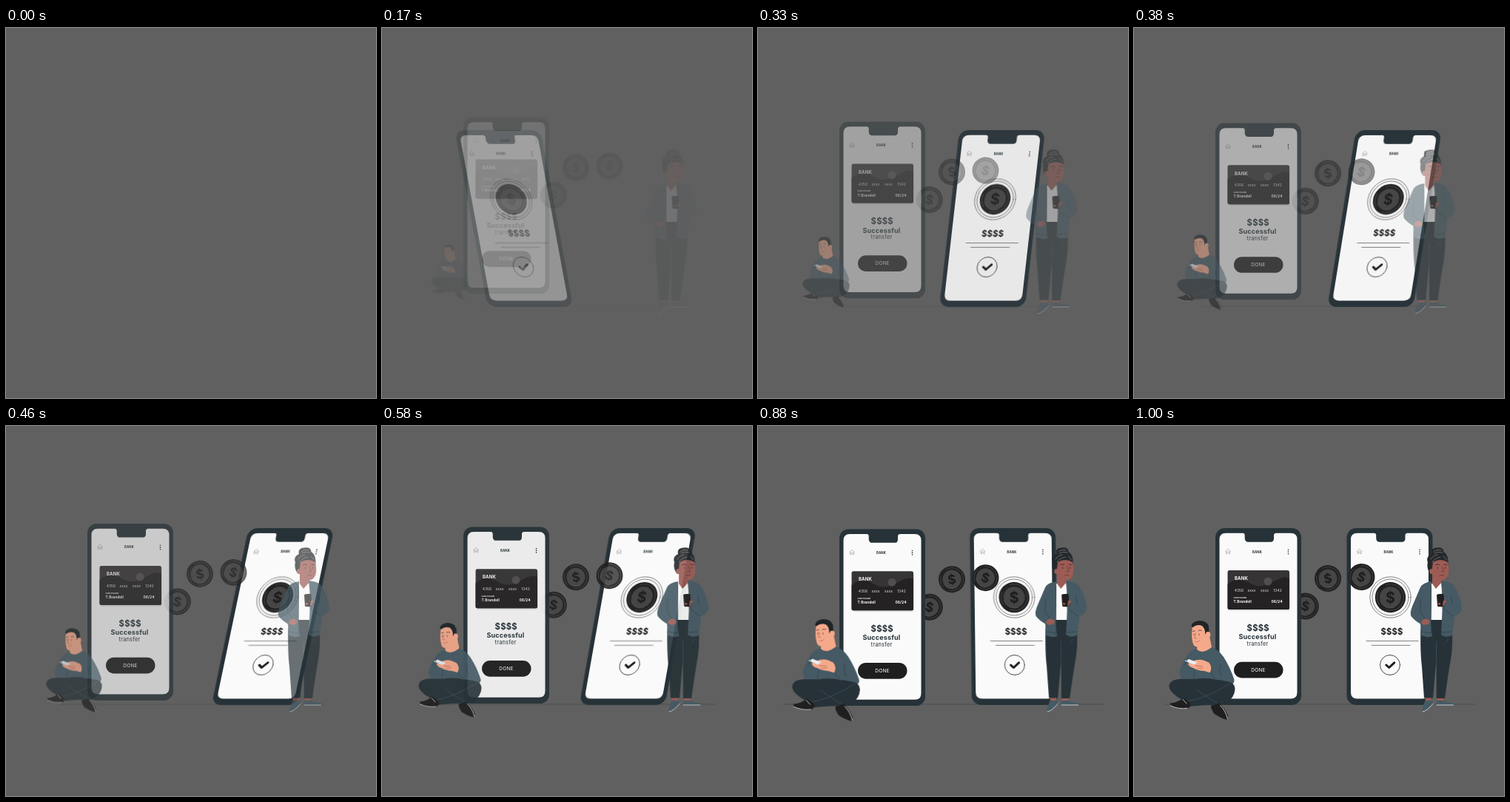
These frames come from a looping animation (500 by 500 pixels, 1.04 s). An HTML page:

```html
<!DOCTYPE html>
<html lang="en">
<head>
<meta charset="utf-8">
<title>Transfer</title>
<style>
  html, body { margin: 0; width: 100%; height: 100%; overflow: hidden; background: #606060; }
  svg { display: block; width: 100vw; height: 100vh; }
  text { font-family: Inter, "Open Sans", sans-serif; text-anchor: middle; letter-spacing: .02em; }
  .b { font-weight: 700; }
  .start { text-anchor: start; }
  .move { transform-box: fill-box; transform-origin: center; opacity: 0; }
  .floor { transform-box: view-box; transform-origin: 251px 376px; }
  .line { fill: none; stroke-linecap: round; stroke-linejoin: round; }
  .skin { fill: #f5a98b; }
  .brown { fill: #9c5c55; }
  .slate { fill: #455a64; }
  .navy { fill: #263238; }
  .ink { fill: #1f1f1f; }
</style>
</head>
<body>
<svg viewBox="0 0 500 500">
  <defs>
    <g id="shell">
      <rect class="navy" width="116" height="239" rx="12.5"/>
      <path fill="#fafafa" d="M14 6.800 H37 Q39.500 6.800 39.700 9.500 V14 Q40 18.700 44.500 18.700 H74.500 Q79 18.700 79 14 V9.500 Q79.300 6.800 82 6.800 H102 Q110.500 6.800 110.500 15.300 V222 Q110.500 230.500 102 230.500 H14 Q5.500 230.500 5.500 222 V15.300 Q5.500 6.800 14 6.800 Z"/>
      <path class="line" stroke="#888" stroke-width=".5" d="M13.800 31.500 L17 28 L20.300 31.500 M14.600 31 V34.600 H16 V32 H18.200 V34.600 H19.700 V31"/>
      <g class="ink"><circle cx="98.500" cy="29.300" r=".8"/><circle cx="98.500" cy="32" r=".8"/><circle cx="98.500" cy="34.700" r=".8"/></g>
      <text class="b" x="56.500" y="33.500" font-size="4.300" fill="#263238">BANK</text>
    </g>
    <g id="coin">
      <circle r="18" fill="#232222"/>
      <circle r="15.500" fill="none" stroke="#414040" stroke-width=".9" stroke-dasharray="30 9 16 12"/>
      <circle r="12.500" fill="#464545"/>
      <path class="line" stroke="#5a5959" stroke-width=".7" d="M-12 4 A12.500 12.500 0 0 0 4 12"/>
      <text class="b" y="6.100" font-size="17" fill="#1d1c1c">$</text>
    </g>
  </defs>

  <path class="move floor line" data-move="zoom" stroke="#3b454a" stroke-width=".6" d="M41 376 H461"/>

  <g class="move" data-move="speed">
    <use href="#shell" x="287.500" y="138"/>
    <g class="line" stroke="#333" stroke-width=".6">
      <circle cx="346.500" cy="231.500" r="27.700"/>
      <circle cx="346.500" cy="231.500" r="24.500"/>
      <path d="M314 290.500 H384 M321 296.400 H373"/>
      <circle cx="346" cy="323" r="13.500" stroke="#1f1f1f" stroke-width=".8"/>
    </g>
    <use href="#coin" transform="translate(346.500 231.500) scale(1.150)"/>
    <text class="b" x="348.500" y="281.600" font-size="11.200" fill="#1f1f1f">$$$$</text>
    <path class="line" stroke="#1f1f1f" stroke-width="3" stroke-linecap="butt" d="M340.800 323 L344.700 326.500 L351.800 319.800"/>
  </g>

  <g class="move" data-move="down">
    <use href="#coin" transform="translate(231.800 243.500) rotate(12)"/>
    <use href="#coin" transform="translate(262 206) rotate(-10)"/>
    <use href="#coin" transform="translate(307.500 204) rotate(17)"/>
  </g>

  <g class="move" data-move="down">
    <use href="#shell" x="110" y="138"/>
    <rect x="128" y="197" width="83" height="53" rx="3" fill="#e2e2e2"/>
    <rect x="126.500" y="195" width="83.500" height="53" rx="2.500" fill="#363434"/>
    <path fill="#242222" d="M126.500 214 C136 205 148 207 158 213 S176 216 185 212 S202 201 210 206 V245.500 Q210 248 207.500 248 H129 Q126.500 248 126.500 245.500 Z"/>
    <circle cx="181" cy="210" r="5.500" fill="#514e4e"/>
    <g fill="#fff">
      <text class="b start" x="136" y="208.300" font-size="6">BANK</text>
      <g font-size="4.900" fill="#e4e4e4">
        <text x="142" y="224">4356</text><text x="159" y="224">xxxx</text>
        <text x="176.500" y="224">xxxx</text><text x="194" y="224">1342</text>
      </g>
      <text class="start b" x="134.500" y="232.800" font-size="2.400">CARD HOLDER</text>
      <text class="start b" x="134.500" y="239" font-size="4.700">T.Brandell</text>
      <text class="b" x="193" y="239" font-size="4.900">06/24</text>
    </g>
    <g fill="#263238">
      <text class="b" x="167.700" y="276.700" font-size="11.200">$$$$</text>
      <text class="b" x="167" y="288" font-size="9">Successful</text>
      <text x="167" y="296.700" font-size="7.500">transfer</text>
    </g>
    <rect class="ink" x="135" y="318.800" width="66.500" height="21.700" rx="10.800"/>
    <text x="168" y="331.800" font-size="6.600" fill="#fff">DONE</text>
  </g>

  <g class="move" data-move="zoom">
    <path class="slate" d="M84 301 Q75 304 71 311 Q64 322 61 333 L65 345 H118 L128 351 Q136 349 135.500 343 Q130 326 121 312 Q114 302 105 299 Z"/>
    <path class="skin" d="M86 291 L85 302 Q92 309 105 299 L102 284 Z"/>
    <path class="skin" d="M79 271 Q77 284 79.500 293 Q81 300 88 298 Q97 296 101 288 L100 268 Q88 264 79 271 Z"/>
    <path fill="#1e2427" d="M77.500 271 Q78 264 88 263 Q99 263 101 271 L101.500 279 Q99 277 98.500 282 L96 281 Q96.500 274 92 270 Q85 267.500 79.500 272 Z"/>
    <ellipse class="skin" cx="100" cy="282" rx="3.300" ry="4"/>
    <g class="line" stroke="#263238" stroke-width=".7">
      <path d="M79.500 277.500 L82.500 276.800 M87 276.500 Q89 275 91.500 276.500 M81 281 V282.500 M88 281 V282.500"/>
      <path stroke="#b9624c" d="M83.500 280 L81.800 286.500 L84.500 287 M83 291.500 Q87 292.500 89 289.500"/>
    </g>
    <path class="navy" d="M62 342 Q47 343 47.500 353 Q49 361 65 370 L74 379 Q94 377 104 377 L111 384 Q114 378 125 374 Q136 367 136.500 355 Q136 346 125 345 Q98 339 83 342 Z"/>
    <g class="line" stroke="#46545b" stroke-width=".7">
      <path d="M72 372 Q95 369 130 348 M84 356 Q98 366 112 374"/>
    </g>
    <path class="ink" d="M49 374.500 Q58 374 67 367.500 L75 373 Q79 378 73 381.500 Q60 383.500 49.500 378 Z"/>
    <path class="ink" d="M104 378.500 L115 374.500 Q123 382 127 391.500 L126.500 397 Q119 396 108.500 389 Q104 383 104 378.500 Z"/>
    <g class="line" stroke="#e8e8e8" stroke-width=".8"><path d="M49.500 378 Q60 383 72 381.500 M66 369.500 L71 375 M116.500 377.500 Q124 385 126.500 396"/></g>
    <path class="slate" d="M101 319 L112 325 L119 336 Q116 346 107 342 L98 331 Z"/>
    <path class="skin" d="M79 318 Q88 314 95 317 L102 320 Q107 326 103 333.500 L95 331 Q87 331 80 327 Q74 325.500 73 321 Z"/>
    <path fill="#e8eef1" d="M68.500 317.500 L74 315 L86 319.500 L81 322.500 Z"/>
    <g class="line" stroke="#2d3f48" stroke-width=".7">
      <path d="M102 320 Q107 326 103 333.500 L111 343 M117 323 Q114 331 118 337 M73 313 Q72 318 68 323 M82 331 Q80 338 81 342"/>
      <path stroke="#b9624c" d="M83 324 L92 324.500 M86 327.500 L93 327"/>
    </g>
  </g>

  <g class="move" data-move="right">
    <path class="brown" d="M394 364 L393.500 374 L401 374 L403.500 364 Z M409.500 364 L410 374 L417.500 374 L419 364 Z"/>
    <path class="navy" d="M388 260 Q386 300 389 325 L392 367.500 H404 L408.500 315 L408.800 368 H420 Q424 338 429 309 Q432 286 428 260 Z"/>
    <path class="line" stroke="#46545b" stroke-width=".7" d="M408.500 291 V316 M424 288 Q423 292 420 294"/>
    <path class="slate" d="M393.500 371 L402 371 L405 374 L397 383 Q393 387 389 386 Q389 382 393.500 371 Z M409 371 L417 371 Q424 374 431.500 374.500 L432 377 H409 Z"/>
    <path class="line" stroke="#e8e8e8" stroke-width=".8" d="M390 386 Q395 386 404.500 375 M409 377 H431.500"/>
    <path fill="#fafafa" d="M402 213 L415 210 L419 262 H401 Z"/>
    <path class="brown" d="M403 200 L403 213 L408 220 L416 211 L417 200 Z"/>
    <path fill="#25282a" d="M397 184 Q394 177 402 173 Q400 165 409 164.500 Q418 163 418.500 170 Q425 174 424.500 185 L424 194 L400 199 Q395 192 397 184 Z"/>
    <path class="brown" d="M404 184 Q414 178 424 184 Q426.500 196 424 202 Q421 209 414 208.500 Q406 207 402 199 Z"/>
    <ellipse class="brown" cx="402" cy="196.500" rx="2.800" ry="3.500"/>
    <g class="line" stroke="#a9adaf" stroke-width=".5"><path d="M401 180 Q404 175 410 174 M403 184 Q407 178 414 177 M418 176 Q421 178 422.500 181 M405 170 Q410 166 415 168 M406 172 Q411 169 417 171"/></g>
    <g class="line" stroke="#2a1a1a" stroke-width=".7">
      <path d="M407.500 187.500 Q410 186 412.500 187.500 M419 187 L422.500 187.500 M410.500 191 V192.500 M420.500 191 V192.500"/>
      <path stroke="#64302d" d="M416.500 190 L418.500 196.500 L415.500 197 M413 202 Q416 200.500 419 202"/>
    </g>
    <path class="slate" d="M402 210 Q389 212 386.500 219 L378 239 Q372 252 374.500 257 Q379 263 388 268 L387 282 Q395 287 403 284 L401 262 Q401.500 237 402 217 Z"/>
    <path class="slate" d="M415 209 Q429 210 433 217 Q442 231 443 247 Q442 253 433 257 Q432 272 429.500 283 Q421 287 415 282 Q416 265 416.500 250 Q418 230 415 209 Z"/>
    <path class="brown" d="M388 266 Q389 261 394 260.500 Q399 261 400 265 Q397 270 391 268.500 Z"/>
    <path class="brown" d="M413 239 Q415 234 418.500 232 L420.500 236 L424 239 L423 245.500 L416 245 Q412 243 413 239 Z"/>
    <rect class="ink" x="409.500" y="227" width="9.500" height="17" rx="1.700" transform="rotate(-4 414 235)"/>
    <path class="brown" d="M411 239 L414 239.500 V241.500 L411 241.500 Z M418 236 L421 236 L422.500 242 L417 243 Z"/>
    <path class="slate" d="M421.500 238 L432 241 L438 254 L431 257 L416.500 247 Z"/>
    <g class="line" stroke="#2d3f48" stroke-width=".7"><path d="M388 234 Q386 246 387 251 L393 260 M387 268 L389 271 M421 239 L418 246.500 L431 257 M429 230 Q428 237 431 241 M388 278 L402 280 M416 279 L429 278 M401.500 217 V281"/></g>
  </g>
</svg>
<script>
  const LENGTH = 1000, LOOP = 1040, FPS = 24, LEAD = 16;
  const easing = "cubic-bezier(.36,-.01,.5,1.38)";
  const enter = (from, to) => [
    { opacity: 0, transform: from, easing },
    { opacity: 1, transform: to }
  ];
  const moves = {
    zoom: enter("scale(.5)", "scale(1)"),
    down: enter("translateY(-20px)", "translateY(0)"),
    right: enter("translateX(-20px)", "translateX(0)"),
    speed: [
      { offset: 0, opacity: 0, transform: "translateX(-250px) skewX(20deg)", easing },
      { offset: .6, opacity: 1, transform: "skewX(-10deg)", easing },
      { offset: .8, opacity: 1, transform: "skewX(2deg)", easing },
      { offset: 1, opacity: 1, transform: "skewX(0deg)" }
    ]
  };

  const anims = [...document.querySelectorAll(".move")].map(el => {
    const anim = el.animate(moves[el.dataset.move], { duration: LENGTH, fill: "both" });
    anim.pause();
    return anim;
  });

  // The picture advances in 24 fps steps and starts empty.
  function draw(now) {
    const step = Math.floor(((now % LOOP) + 5.5) * FPS / 1000);
    const time = step < 2 ? 0 : Math.min(LENGTH, step * 1000 / FPS + LEAD);
    for (const anim of anims) anim.currentTime = time;
  }

  const start = performance.now();
  function tick() {
    draw(performance.now() - start);
    requestAnimationFrame(tick);
  }
  tick();
</script>
</body>
</html>
```
